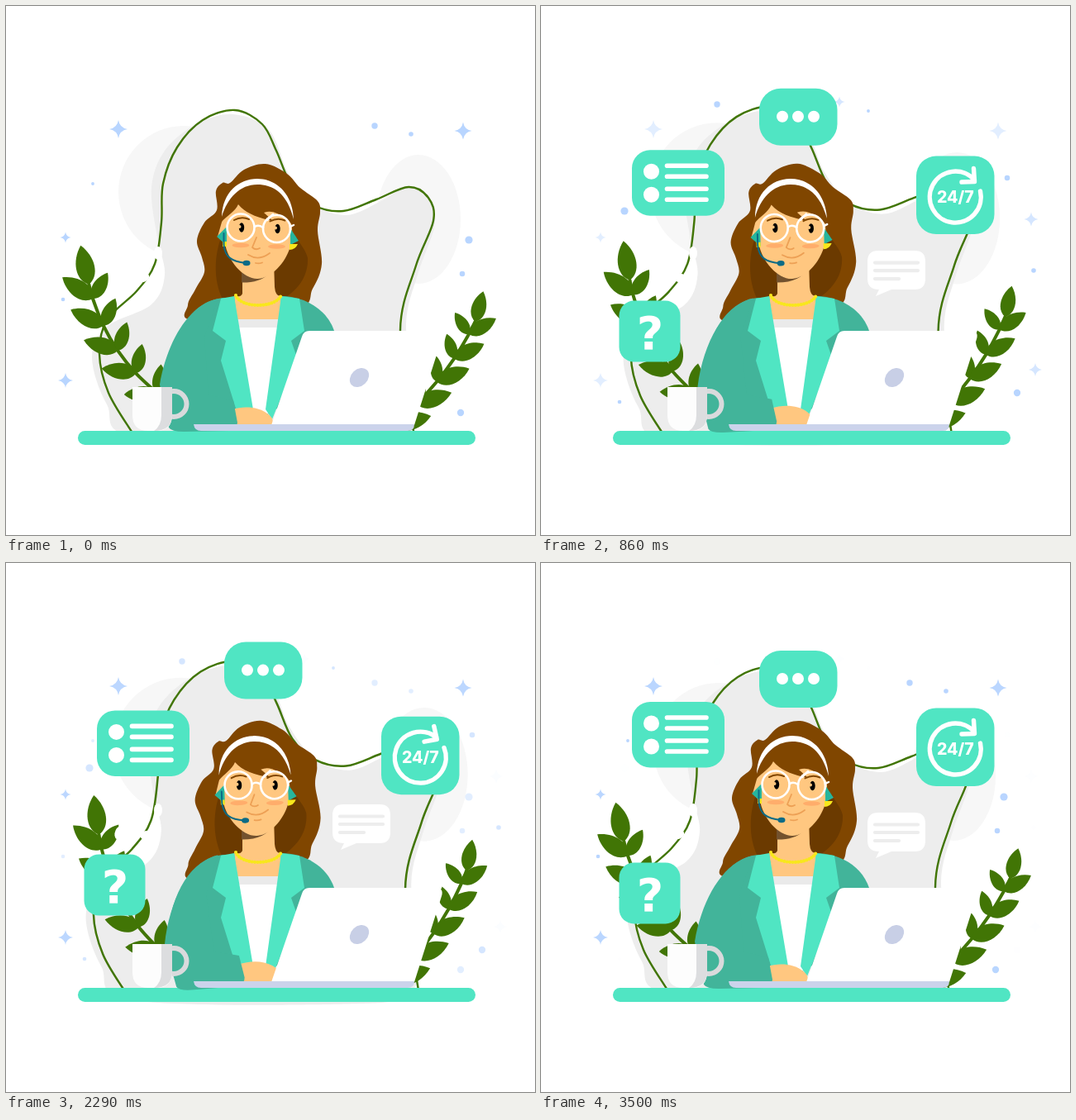
These frames come from a looping animation (640 px wide and 640 px high, 3.57 s). An HTML page:

```html
<!DOCTYPE html>
<html lang="en">
<head>
<meta charset="utf-8">
<title>Support desk</title>
<style>
html, body { margin: 0; width: 100%; height: 100%; overflow: hidden; background: #fff; }
svg { display: block; width: 100%; height: 100%; }
text { fill: #fff; text-anchor: middle; }
.line { fill: none; stroke-linecap: round; stroke-linejoin: round; }
.teal { fill: #50e5c3; }
.dark { fill: #42b49a; }
.skin { fill: #ffc780; }
.hair { fill: #804600; }
.green { fill: #417505; }
.spark { fill: #b8d5ff; }
</style>
</head>
<body>
<svg viewBox="0 0 640 640">
  <g id="blob">
    <g fill="#f7f7f7"><ellipse cx="215" cy="225" rx="79" ry="80"/><ellipse cx="499" cy="258" rx="51" ry="78"/></g>
    <path id="shade" fill="#ededed"/>
    <path id="loop" class="line" stroke="#417505" stroke-width="2.4"/>
  </g>
  <g id="sparks"></g>
  <g id="plantL" class="green"></g>
  <g id="plantR" class="green"></g>
  <g fill="#fff">
    <ellipse cx="184" cy="299" rx="5" ry="8"/>
    <ellipse cx="168" cy="329" rx="6" ry="4" transform="rotate(-40 168 329)"/>
    <ellipse cx="138" cy="326" rx="6" ry="9" transform="rotate(25 138 326)"/>
    <ellipse cx="524" cy="388" rx="4" ry="8"/>
  </g>
  <g id="cards"></g>

  <rect class="teal" x="87" y="514" width="481" height="17" rx="8.5"/>
  <g class="head">
    <path id="hair" class="hair"/>
    <path fill="#6b3a00" d="M262 275C252 300 250 330 262 355H335C350 345 366 330 365 305C363 295 355 288 352 280Z"/>
  </g>
  <path class="dark" d="M262 353C222 358 201 400 195 450L215 512H285L340 480L397 393C388 366 360 351 333 351Z"/>
  <path class="skin" d="M286 312V348Q284 353 276 351L280 384H331L333 351Q326 352 325 340L324 308Z"/>
  <path fill="#73522e" d="M285 315L324 312Q318 335 285 334.500Z"/>
  <path fill="#fff" d="M278 379H332L317 493L298 493Z"/>
  <path fill="#eaeaea" d="M278 379H332L330 389H280Z"/>
  <path class="teal" d="M260 354L276 351L299 488L296 506H284L260 429L266 405L250 393Z"/>
  <path class="teal" d="M355 354L333 351L314 488L322 500L352 425L345 405L361 393Z"/>
  <path class="line" stroke="#f8e71c" stroke-width="4.2" stroke-dasharray="0 3.4" d="M278 350C284 366 326 366 333 350"/>
  <g class="head">
    <path class="skin" d="M262 258C262 230 285 220 305 222C335 222 348 245 346 280C344 306 322 330 304 330C287 330 268 308 265 287L256 279Z"/>
    <path fill="#26b59d" d="M255 279L267 267V290ZM354 284L344 269V289Z"/>
    <path fill="#f8e71c" d="M262 285h5v6h-5zM343 288h10q-3 7-10 7z"/>
    <path class="hair" d="M260 262C262 225 285 205 306 207C335 208 352 235 348 268C345 262 338 255 328 251Q320 247 312 250L323 260C304 256 290 251 281 240C277 249 268 253 260 262Z"/>
    <path fill="#fff" d="M261 255C262 225 282 209 304 209C328 209 347 228 348 258C341 230 326 216 304 216C283 216 268 232 261 255Z"/>
    <g id="eyes"></g>
    <g id="glasses"></g>
    <path class="line" stroke="#fff" stroke-width="2.5" d="M301 267Q306 264 311 268M344 267L348 265M316 259L323 252"/>
    <path class="line" stroke="#eda055" stroke-width="1.8" d="M303 280L298 292Q302 296 307 293M293 301Q306 309 319 299M302 311Q306 312 310 310.500"/>
    <path class="line" stroke="#0b6b86" stroke-width="2" d="M263.500 275V289C265 304 273 309 290 311"/>
    <ellipse fill="#0b6b86" cx="291" cy="311" rx="4.500" ry="3.200"/>
  </g>
  <g id="arm">
    <path class="skin" d="M274 488C290 483 312 485 322 499L325 512H278Z"/>
    <path class="dark" d="M257 354C222 360 195 405 186 458L197 510Q200 515 215 515L270 514Q280 511 280 504L275 477L245 470L240 400Z"/>
  </g>
  <path fill="#fff" d="M367 393H520Q530 393 527 403L494 507H321L358 400Q360 393 367 393Z"/>
  <ellipse fill="#c8cfe6" cx="427.500" cy="449.500" rx="13" ry="10" transform="rotate(-44 427.500 449.500)"/>
  <path fill="#cbd3eb" d="M227 506H494Q494 514 486 514H236Q228 514 227 506Z"/>
  <circle class="line" stroke="#d9dadc" stroke-width="6" cx="203" cy="481.500" r="15.500"/>
  <path fill="#fdfdfd" d="M153 461H201V495Q201 514 182 514H172Q153 514 153 495Z"/>
  <path fill="#dcdddf" d="M188 461H201V495Q201 514 179 514Q188 508 188 495Z"/>
</svg>
<script>
const $ = id => document.getElementById(id);
const LOOP = 3570, FPS = 14, FRAMES = 50, TAU = 2 * Math.PI;
const html = (id, list) => { $(id).innerHTML = list.join(''); };
const times = (n, fn) => Array.from({ length: n }, (_, i) => fn(i));

// Smooth curve through a list of points
function spline(pts, closed) {
  const n = pts.length;
  const at = i => closed ? pts[(i + n) % n] : pts[Math.min(n - 1, Math.max(0, i))];
  const mix = (a, b, c) => a.map((v, j) => (v + (c[j] - b[j]) / 6).toFixed(1));
  return 'M' + pts[0] + times(closed ? n : n - 1, i =>
    `C${mix(at(i), at(i - 1), at(i + 1))} ${mix(at(i + 1), at(i + 2), at(i))} ${at(i + 1)}`).join('');
}
const trace = (id, text, closed) =>
  $(id).setAttribute('d', spline(text.split(', ').map(p => p.split(' ').map(Number)), closed));

trace('shade', '275 131, 318 150, 342 203, 372 240, 412 253, 452 237, 487 219, 514 238, 518 268, 498 325, 484 385, 494 470, 480 515, 410 526, 160 522, 122 482, 104 425, 122 388, 176 361, 192 325, 183 280, 176 220, 192 175, 230 143', true);
trace('loop', '152 515, 124 468, 113 421, 122 380, 158 345, 180 312, 188 262, 190 215, 207 171, 238 138, 277 126, 310 143, 327 175, 345 216, 372 241, 408 248, 448 234, 487 219, 511 232, 517 260, 496 314, 477 392, 493 514');
trace('hair', '314 191, 340 203, 356 220, 377 236, 380 250, 377 272, 382 312, 371 342, 350 368, 228 380, 220 362, 229 343, 240 322, 237 304, 231 284, 240 262, 255 247, 254 224, 262 214, 271 214, 288 198', true);

const leaf = ([x, y], deg, len) => {
  const w = len * .31, a = len * .15, b = len * .65;
  return `<path transform="translate(${x} ${y}) rotate(${deg})" d="M0 0C${a} ${-w} ${b} ${-w} ${len} 0C${b} ${w} ${a} ${w} 0 0Z"/>`;
};
// A bent stem with a leaf at its tip and five pairs down its length
const plant = (id, stem, tip, left, right) => html(id, [
  `<path class="line" stroke="#417505" stroke-width="4" d="${spline([-.5, 0, 1, 2, 3, 4].map(stem))}"/>`,
  leaf(stem(-.5), ...tip),
  ...times(5, i => leaf(stem(i), ...left(i)) + leaf(stem(i), ...right(i)))
]);
plant('plantL', i => [105 + 10.5 * i + 2.3 * i * i, 354 + 34 * i - 1.3 * i * i],
  [-102, 48], i => [-145 - 9 * i, 45 - i], i => [-60 - 6 * i, 36]);
plant('plantR', i => [560 - 16 * i - 1.7 * i * i, 397 + 30 * i - .6 * i * i],
  [-75, 38], i => [-123 + 16 * i, 31], i => [-30 + 4 * i, 38 + 2.2 * i]);

const dot = (x, y, r) => `<circle cx="${x}" cy="${y}" r="${r}"/>`;
const star = (x, y, r) => {
  const k = r * .14;
  return `<path transform="translate(${x} ${y})" d="M0 ${-r}Q${k} ${-k} ${r} 0Q${k} ${k} 0 ${r}Q${-k} ${k} ${-r} 0Q${-k} ${-k} 0 ${-r}Z"/>`;
};
// Each group runs from its largest mark to its smallest
const spark = (draw, size, spots) =>
  `<g class="spark">${spots.map(([x, y], i) => draw(x, y, size(i))).join('')}</g>`;
const speck = i => 4.6 - .45 * i;
html('sparks', [
  spark(star, i => 11 - i * i / 2, [[136, 149], [553, 151], [72, 453], [72, 280]]),
  spark(star, i => 8.5 - i * i / 2, [[593, 258], [598, 440], [361, 116]]),
  spark(dot, speck, [[560, 283], [550, 492], [446, 145], [552, 324], [490, 155], [69, 355], [105, 215]]),
  spark(dot, speck, [[101, 248], [576, 468], [213, 119], [564, 208], [596, 320], [95, 479], [396, 127]])
]);

const bothEyes = art => [[284, 268], [327.5, 269.5]].map(p => `<g transform="translate(${p})">${art}</g>`);
html('eyes', bothEyes('<ellipse cx="1" rx="3.2" ry="5.8"/><circle class="skin" cx="-1.5" cy="-1" r="2"/>'));
html('glasses', bothEyes('<ellipse fill="#ffad6b" cy="21.500" rx="10.500" ry="2.800"/>'
  + '<path class="line" stroke="#804600" stroke-width="2" d="M-8 -9Q1 -14 10 -10"/>'
  + '<circle class="line" stroke="#fff" stroke-width="2.600" r="16.500"/>'));

const box = (x, y, w, h, r) => `<rect class="teal" x="${x}" y="${y}" width="${w}" height="${h}" rx="${r}"/>`;
const stroke = (d, w, color = '#fff') => `<path class="line" stroke="${color}" stroke-width="${w}" d="${d}"/>`;
const RING = [501.3, 225], MARK = [132, 400];
const onRing = deg => RING.map((c, i) => c + 31 * (i ? Math.sin : Math.cos)(deg * TAU / 360)).join(' ');

// drift: vertical travel; at: anchor of the pop; start and time in ms
const cards = [
  { drift: -12.5, at: [406, 357], start: -10, time: 500,
    art: '<path fill="#fff" d="M408 302H452Q465 302 465 315V336Q465 349 452 349H424L405 357L409 349Q395 349 395 336V315Q395 302 408 302Z"/>'
      + stroke('M404 316.500H456M404 326H456M404 336H433', 4.2, '#ededed') },
  { drift: 12.7, at: [454, 270], start: 56, time: 600,
    art: box(454, 175.5, 94.5, 94.5, 24)
      + `<g id="arrow">${stroke(`M${onRing(-13)}A31 31 0 1 1 ${onRing(-42)}M523.500 190.500L524.500 206.500L509 207`, 5.4)}</g>`
      + '<text x="501.300" y="232" font-family="Inter, sans-serif" font-size="19.500" font-weight="800">24/7</text>' },
  { drift: 13, at: [222, 247.5], start: 138, time: 600,
    art: box(110, 168, 112, 79.5, 22) + [194, 222].map(y =>
      `<g fill="#fff">${dot(133.5, y, 9.5)}</g>` + stroke(`M152.500 ${y - 7}H200M152.500 ${y + 6}H200`, 5.6)).join('') },
  { drift: -13, at: [311.3, 175], start: 156, time: 600,
    art: box(264, 106, 94.5, 69, 26)
      + `<g id="dots" fill="#fff">${times(3, i => dot(292 + 19 * i, 140, 7)).join('')}</g>` },
  { drift: -12.5, at: [168.5, 362.5], start: 210, time: 600,
    art: box(94.5, 362.5, 74, 74, 18)
      + `<text id="mark" x="${MARK[0]}" y="421" font-family="DejaVu Sans, sans-serif" font-size="56" font-weight="700">?</text>` }
];
html('cards', cards.map(c => `<g>${c.art}</g>`));

const cardEls = [...$('cards').children], sparkEls = [...$('sparks').children];
const dotEls = [...$('dots').children], heads = document.querySelectorAll('.head');
const clamp = v => Math.min(1, Math.max(0, v));
const ease = v => (1 - Math.cos(Math.PI * clamp(v))) / 2;
const wave = v => (1 + Math.cos(TAU * v)) / 2;
const move = (el, v) => el.setAttribute('transform', v);
const turn = (el, deg, x, y) => move(el, `rotate(${deg} ${x} ${y})`);
const zoom = (x, y, sx, sy) => `translate(${x} ${y}) scale(${sx} ${sy}) translate(${-x} ${-y})`;

function render(k) {
  const t = k * 1000 / FPS;
  const s = 1 - wave(t / 3530);

  const grow = 1 + .045 * s;
  move($('blob'), zoom(310, 318, grow, grow));
  turn($('plantL'), 5.7 * s, 208, 485);
  turn($('plantR'), -5.7 * s, 440, 507);
  heads.forEach(h => turn(h, -2.6 * s, 305, 350));
  turn($('arm'), -4.5 * s, 245, 365);

  const blink = clamp(1 - Math.abs(k - 25) / 2);
  move($('eyes'), zoom(306, 270, 1, 1 - .9 * blink));

  const a = wave(k * 3 / FRAMES), b = wave(k * 2 / FRAMES);
  [a, 1 - a, b, 1 - b].forEach((v, i) => sparkEls[i].setAttribute('opacity', v));

  cards.forEach((c, i) => {
    const size = k ? ease((t - c.start) / c.time) : 0;
    cardEls[i].style.display = size > 0 ? '' : 'none';
    move(cardEls[i], `translate(0 ${c.drift * s}) ` + zoom(...c.at, size, size));
  });

  dotEls.forEach((el, i) => {
    const peak = 18.3 + 2.8 * i;
    const gap = Math.min(Math.abs(k - peak), Math.abs(k - peak - 20));
    move(el, `translate(0 ${-13.5 * wave(Math.min(gap / 5.4, .5))})`);
  });
  turn($('arrow'), 360 * ease((k - 16) / 17.8), ...RING);
  const beat = clamp(((k + 6) % 20) / 8);
  turn($('mark'), k < 14 ? 0 : 8 * Math.sin(TAU * beat), ...MARK);
}

const begin = performance.now();
function tick() {
  const t = (performance.now() - begin) % LOOP;
  render(Math.floor((t + 5) * FPS / 1000) % FRAMES);
  requestAnimationFrame(tick);
}
tick();
</script>
</body>
</html>
```
